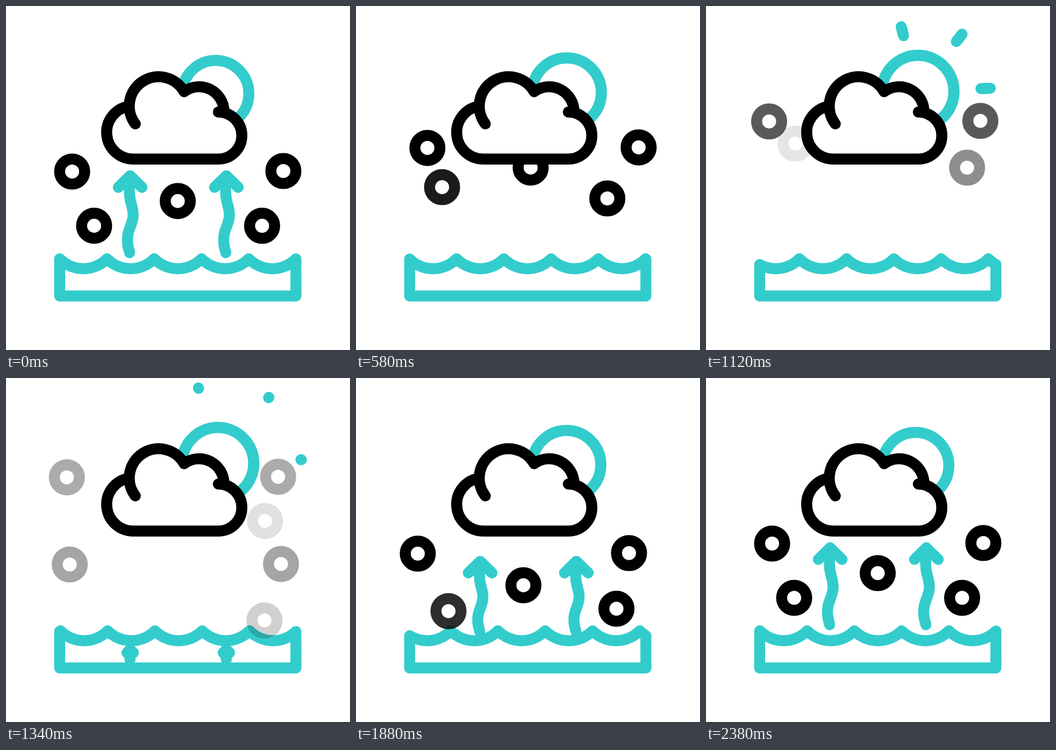
These frames come from a looping animation (640 by 640 pixels, 2400 ms). An HTML page with a canvas:

```html
<!DOCTYPE html>
<html lang="en">
<head>
<meta charset="utf-8">
<title>Evaporation</title>
<style>
  html, body { margin: 0; width: 100%; height: 100%; overflow: hidden; background: #fff; }
  canvas { display: block; width: 100vw; height: 100vh; object-fit: contain; }
</style>
</head>
<body>
<canvas id="stage" width="640" height="640"></canvas>
<script>
const ctx = document.getElementById('stage').getContext('2d');
const TEAL = '#33cccc', BLACK = '#000';
const LOOP = 2400, SPAN = 2380, LINE = 20.5;

const ramp = (t, a, b) => Math.max(0, Math.min(1, (t - a) / (b - a)));
const smooth = (u) => u * u * (3 - 2 * u);

const SHAFT = new Path2D('M0 0C-1 10-2 25-1 36C0 52 6 58 5.5 74C5 92-6 100-5 122C-5 130-2 138-1 143');
const HEAD = new Path2D('M-22 21.5L0 0L22 21.5');
const CLOUD_FILL = new Path2D('M395 284.7H238A49.5 49.5 0 0 1 228 186.5A54.6 54.6 0 0 1 331.5 159.4' +
  'A46 46 0 0 1 405 197A43.75 43.75 0 0 1 395 284.7Z');
const CLOUD_LINE = new Path2D('M240.5 219.3A54.6 54.6 0 1 1 331.5 159.4A46.3 46.3 0 0 1 405.5 196.4' +
  'M395 197.2A43.75 43.75 0 0 1 395 284.7H238A49.5 49.5 0 0 1 228 186.5');

function stroke(color, width, path) {
  ctx.strokeStyle = color;
  ctx.lineWidth = width;
  path ? ctx.stroke(path) : ctx.stroke();
}

function ring(x, y, r, color, width = LINE) {
  ctx.beginPath();
  ctx.arc(x, y, r, 0, 2 * Math.PI);
  stroke(color, width);
}

function drawSun(t) {
  const k = 1.1 * smooth(1 - Math.abs(2 * t / SPAN - 1));
  ring(390 + 4 * k, 163 - 4 * k, 61.8 + 4.7 * k, TEAL, LINE + .5 * k);
}

function drawRays(t) {
  const head = ramp(t, 1030, 1230), tail = ramp(t, 1160, 1345);
  if (head <= 0 || tail >= 1) return;
  for (const [x, y] of [[358, 18.5], [489, 36], [549.5, 152]]) {
    const a = Math.atan2(y - 159, x - 394);
    const at = (u) => [x - 38 * (1 - u) * Math.cos(a), y - 38 * (1 - u) * Math.sin(a)];
    ctx.beginPath();
    ctx.moveTo(...at(tail));
    ctx.lineTo(...at(head));
    stroke(TEAL, LINE);
  }
}

// The water drifts three wavelengths per loop; keys are [time, shift]
const DRIFT = [[0, 0], [240, 12], [580, 87], [880, 144], [1340, 177], [1880, 252], [SPAN, 264]];

function drift(t) {
  const n = DRIFT.length - 1;
  const key = (i) => {
    const turn = Math.floor(i / n), [time, x] = DRIFT[i - turn * n];
    return [time + turn * SPAN, x + turn * DRIFT[n][1]];
  };
  let i = 0;
  while (i < n - 1 && t > DRIFT[i + 1][0]) i++;
  const [p, a, b, q] = [-1, 0, 1, 2].map((d) => key(i + d));
  const rate = (from, to) => (to[1] - from[1]) / (to[0] - from[0]);
  const h = b[0] - a[0], u = (t - a[0]) / h, v = 1 - u;
  return a[1] + (b[1] - a[1]) * smooth(u) + h * u * v * (v * rate(p, b) - u * rate(a, q));
}

function drawWater(t) {
  const pitch = 87.9, R = 61.6, left = 99.8, right = 539.4, base = 539.6;
  const shift = drift(t);
  ctx.beginPath();
  ctx.moveTo(left, base);
  for (let x = left; x <= right; x += .5) {
    const p = (((x - 100 - shift) % pitch) + pitch) % pitch - pitch / 2;
    ctx.lineTo(x, 427.1 + Math.sqrt(R * R - p * p));
  }
  ctx.lineTo(right, base);
  ctx.closePath();
  stroke(TEAL, LINE);
}

// Position at age 0, climb rate, sway width, and the ages of birth and death
const bubbles = [
  { x: 123, y: 308, rate: 1, sway: 10, born: -1180, gone: 1564 },
  { x: 516, y: 307, rate: 1, sway: 10, born: -1180, gone: 1564 },
  { x: 319.5, y: 363, rate: 1.42, sway: 9, born: -900, gone: 1322 },
  { x: 164, y: 409, rate: 1.64, sway: -15, born: -828, gone: 1190 },
  { x: 476.5, y: 409, rate: 1.16, sway: -10, born: -1112, gone: 1422 }
];

// Bubbles start slowly, then climb twice as fast and swing with their height
function bubbleOffset(age, rate, sway) {
  if (age < 0) return [Math.sign(sway) * 8.5 * Math.sin(.0025 * age), -.0375 * age * (1 + rate) / 2];
  const climb = rate * (.075 * age + 22.5 * (age / 1340) ** 5);
  return [sway * Math.sin(.04 * climb), -climb];
}

function drawBubbles(t) {
  for (const { x, y, rate, sway, born, gone } of bubbles) {
    for (const age of [t, t - SPAN]) {
      if (age <= born || age >= gone) continue;
      const [dx, dy] = bubbleOffset(age, rate, sway);
      ctx.globalAlpha = Math.min(ramp(age, born, born + 400), ramp(age, gone, gone - 680));
      ring(x + dx, y + dy, 23.3, BLACK);
    }
  }
  ctx.globalAlpha = 1;
}

function drawCloud() {
  ctx.fillStyle = '#fff';
  ctx.fill(CLOUD_FILL);
  stroke(BLACK, LINE, CLOUD_LINE);
}

// Arrows shoot up out of the water, then their tails catch up with the heads
function drawArrows(t) {
  const born = -1060, gone = 420;
  const age = t < gone ? t : t - SPAN;
  if (age <= born) return;
  const grow = 1 - ramp(age, 0, born) ** 2.75;
  const tip = 516 - 200 * grow - .105 * Math.max(0, age);
  const head = Math.min(1, 5 * grow, ramp(age, gone, 240));
  const length = 148 * (1 - ramp(age, 0, gone) ** 1.5);
  const part = (path, scale, x) => {
    const placed = new Path2D();
    placed.addPath(path, new DOMMatrix([scale, 0, 0, scale, x, tip]));
    stroke(TEAL, LINE, placed);
  };
  for (const x of [231, 410]) {
    ctx.setLineDash([length, 400]);
    part(SHAFT, grow ** .7, x);
    ctx.setLineDash([]);
    part(HEAD, head, x);
  }
}

function frame() {
  const t = Math.min(performance.now() % LOOP, SPAN);
  ctx.fillStyle = '#fff';
  ctx.fillRect(0, 0, 640, 640);
  ctx.lineCap = ctx.lineJoin = 'round';
  drawSun(t);
  drawRays(t);
  drawWater(t);
  drawBubbles(t);
  drawCloud();
  drawArrows(t);
  requestAnimationFrame(frame);
}
frame();
</script>
</body>
</html>
```
